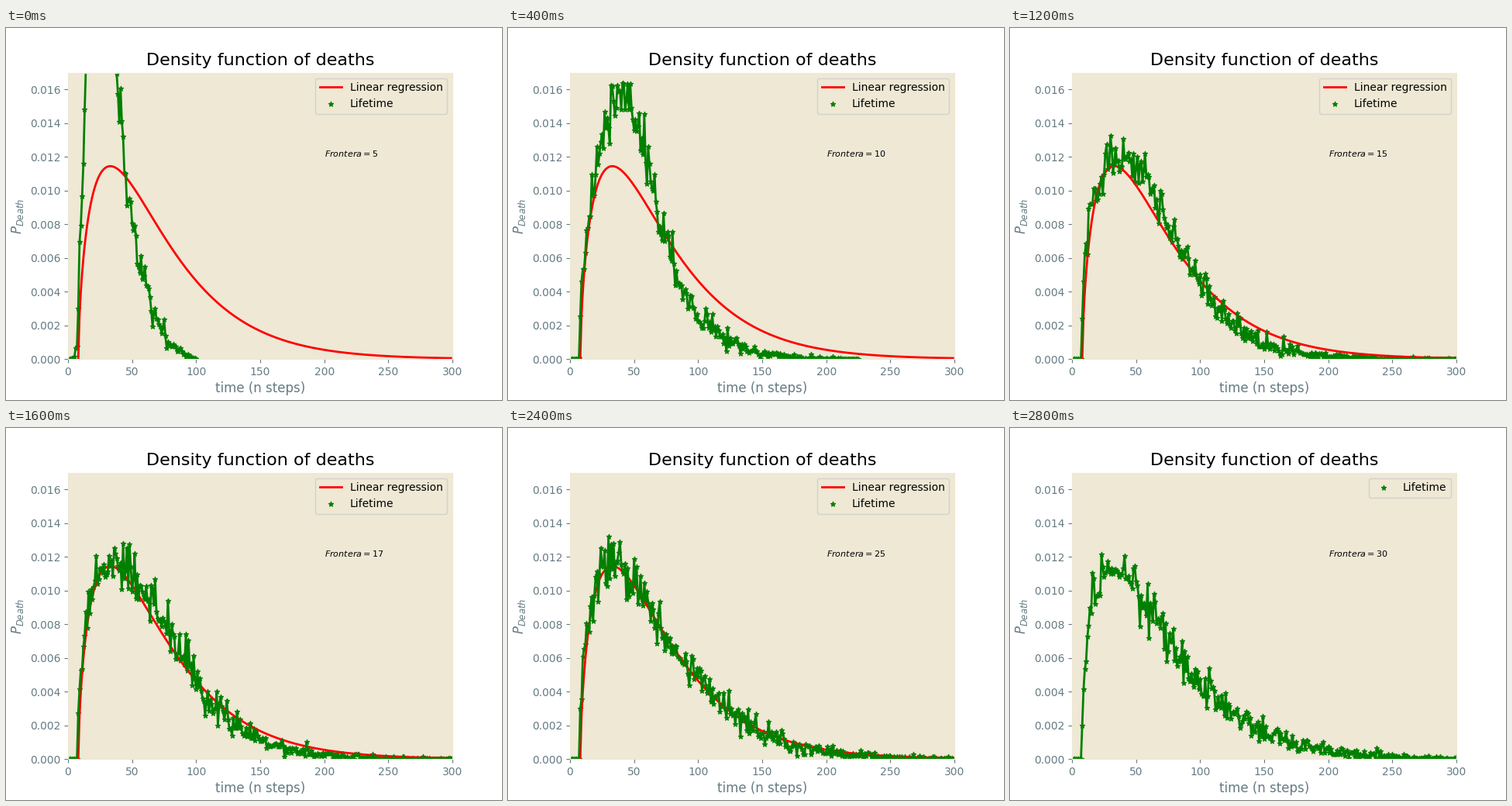
Animation, 640 px wide and 480 px high, one loop 3200 ms. Source, as a matplotlib script:

```python
import math

import numpy as np
import matplotlib.pyplot as plt
from matplotlib.animation import FuncAnimation

GREY, SAND = "#657b83", "#eee8d5"
BORDERS = [5, 10, 12, 15, 17, 20, 25, 30]
WALKERS = 15000          # sets the scatter of the counts
STEPS = np.arange(1, 311)


def gamma_pdf(x, start, a=0.655, b=0.0262):
    t = np.maximum(x - start, 0)
    return b ** (a + 1) / math.gamma(a + 1) * t ** a * np.exp(-b * t)


def death_density(border):
    """Natural deaths competing with deaths at the border."""
    natural = gamma_pdf(STEPS, 7)
    alive = 1 - np.cumsum(natural)
    # the border is reached later and less often the farther it lies
    ramp = 1 - np.exp(-(STEPS / (4.35 * border)) ** 3.5)
    hazard = 2.2 / (border ** 2 + 20) * ramp
    inside = np.exp(-np.cumsum(hazard))
    return inside * (natural + alive * hazard)


def lifetimes(border):
    rng = np.random.default_rng(border)
    last = 25 * (border - 1)
    x = STEPS[STEPS <= last]
    mean = death_density(border)[:len(x)] * (1 - (x / last) ** 12)
    return x, rng.poisson(mean * WALKERS) / WALKERS


fig, ax = plt.subplots(figsize=(6.4, 4.8), dpi=100, facecolor="white")
fig.subplots_adjust(left=0.125, right=0.9, bottom=0.11, top=0.88)


def draw(i):
    border = BORDERS[i]
    x, y = lifetimes(border)
    ax.clear()
    ax.set_facecolor(SAND)
    for spine in ax.spines.values():
        spine.set_color(SAND)
    if border < 30:
        fit_x = np.arange(8, 300)
        ax.plot(fit_x, gamma_pdf(fit_x, 8), color="red", lw=2,
                label="Linear regression")
    ax.plot(x, y, color="green", lw=2)
    ax.scatter(x, y, s=20, marker="*", color="green", label="Lifetime")
    ax.set_xlim(0, 300)
    ax.set_ylim(0, 0.017)
    ax.tick_params(color=GREY, labelcolor=GREY)
    ax.set_title("Density function of deaths", fontsize=16, pad=6.7)
    ax.set_xlabel("time (n steps)", fontsize=12, color=GREY, labelpad=3.3)
    ax.set_ylabel("$P_{Death}$", fontsize=12, color=GREY)
    ax.text(200, 0.012, f"$Frontera = {border}$", fontsize=8)
    ax.legend(loc="upper right", fontsize=10, facecolor=SAND)
    return []


anim = FuncAnimation(fig, draw, frames=len(BORDERS), init_func=lambda: [],
                     interval=400, repeat=True, repeat_delay=0)
plt.show()
```
